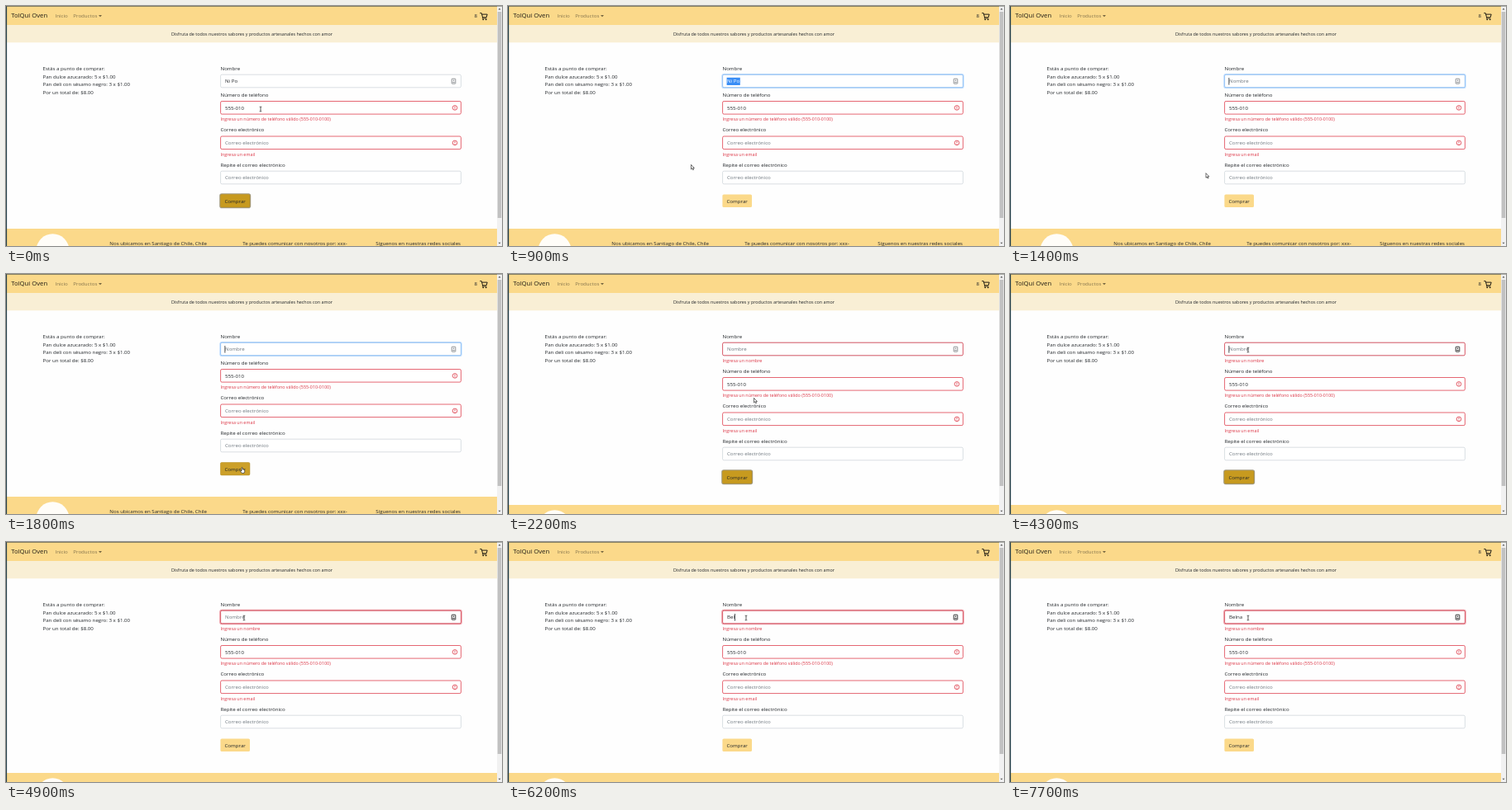
An HTML page for the animation above (8000 ms loop, 600 by 291 pixels).

```html
<!DOCTYPE html>
<html lang="es">
<head>
<meta charset="utf-8">
<title>Formulario de compra</title>
<style>
  html, body { margin: 0; width: 100%; height: 100%; overflow: hidden; background: #fefefe; }
  svg { display: block; width: 100vw; height: 100vh; }
  text { font-family: "Open Sans", "Noto Sans", sans-serif; font-size: 6.15px; fill: #212529; white-space: pre; }
  .brand { font-size: 7.7px; fill: #1c1a14; }
  .link { fill: #84744d; }
  .small { font-size: 5.42px; }
  .error { font-size: 5.4px; fill: #dc3545; }
  .hint { fill: #6c757d; }
</style>
</head>
<body>
<svg id="stage" viewBox="0 0 600 291" preserveAspectRatio="none"></svg>
<script>
const LOOP = 8000, STEP = 100;
const RED = '#dc3545', YELLOW = '#fbd98a', DARK = '#c79a1f';
const stage = document.getElementById('stage');

// Drawing helpers
function add(parent, tag, attrs, content) {
  const node = document.createElementNS('http://www.w3.org/2000/svg', tag);
  for (const key in attrs) node.setAttribute(key, attrs[key]);
  if (content) node.textContent = content;
  parent.appendChild(node);
  return node;
}
const group = parent => add(parent, 'g', {});
const rect = (parent, x, y, width, height, fill, more) =>
  add(parent, 'rect', { x, y, width, height, fill, ...more });
const path = (parent, d, more) => add(parent, 'path', { d, ...more });
// y is the optical middle of the line
const text = (parent, x, y, content, cls = '', more) =>
  add(parent, 'text', { x, y: y + 2.2, class: cls, ...more }, content);
const fade = (node, value) => node.setAttribute('opacity', value);

function outline(parent, y, stroke, width = 0.75, more) {
  return rect(parent, 259.6, y, 290.8, 15.6, 'none', { rx: 1.6, stroke, 'stroke-width': width, ...more });
}
function field(parent, y, content, cls, invalid) {
  rect(parent, 259.6, y, 290.8, 15.6, '#fff', { rx: 1.6 });
  outline(parent, y, invalid ? RED : '#ced4da');
  text(parent, 265, y + 8, content, cls);
  if (invalid) {
    const cy = y + 7.9;
    add(parent, 'circle', { cx: 543, cy, r: 2.8, fill: 'none', stroke: RED, 'stroke-width': 0.8 });
    path(parent, `M543 ${cy - 1.6}v1.8M543 ${cy + 0.9}v0.8`, { stroke: RED, 'stroke-width': 0.9 });
  }
}

// Page header
rect(stage, 0, 0, 600, 291, '#fefefe');
rect(stage, 0, 0, 594, 23, YELLOW);
rect(stage, 0, 23, 594, 21.3, '#f9efd5');
text(stage, 6.3, 12, 'TolQui Oven', 'brand');
text(stage, 59.5, 12, 'Inicio', 'link');
text(stage, 81.3, 12, 'Productos', 'link');
path(stage, 'M112 11h4l-2 2.2z', { fill: '#75663f' });
text(stage, 566.5, 12, '8');
path(stage, 'M573.3 8.6h1.9l1.4 5.2h4.5l1.1-3.7h-6.5', { fill: 'none', stroke: '#211d14', 'stroke-width': 1 });
path(stage, 'M576.6 13.8l-.3 1.2h5', { fill: 'none', stroke: '#211d14', 'stroke-width': 0.8 });
for (const cx of [577.2, 580.7]) add(stage, 'circle', { cx, cy: 16.3, r: 0.9, fill: '#211d14' });
text(stage, 297.5, 34, 'Disfruta de todos nuestros sabores y productos artesanales hechos con amor',
  'small', { 'text-anchor': 'middle' });

// Order summary
['Estás a punto de comprar:', 'Pan dulce azucarado: 5 x $1.00',
  'Pan deli con sésamo negro: 3 x $1.00', 'Por un total de: $8.00']
  .forEach((line, i) => text(stage, 44.5, 75.8 + i * 9.6, line));

// Name field
const nameY = 83.2;
text(stage, 259.5, 75.8, 'Nombre');
const blueRing = outline(stage, nameY, '#bfdeff', 2.6);
const redRing = outline(stage, nameY, '#ee9aa4', 2.8);
rect(stage, 259.6, nameY, 290.8, 15.6, '#fff', { rx: 1.6 });
outline(stage, nameY, '#ced4da');
const blueEdge = outline(stage, nameY, '#80bdff');
const redEdge = outline(stage, nameY, RED);
const selection = rect(stage, 264.6, 86.8, 16.2, 9.2, '#3a8ef6');
const nameText = text(stage, 265, 91.2, '');
const nameWidth = () => nameText.getComputedTextLength();
const caret = rect(stage, 264.5, 87, 0.8, 8.6, '#212529');
const card = group(stage);
rect(card, 539.2, 88.2, 4.6, 6, '#fff', { rx: 0.5, stroke: 'currentColor', 'stroke-width': 0.9 });
add(card, 'circle', { cx: 541.5, cy: 90.3, r: 0.8, fill: 'currentColor' });
path(card, 'M540.2 92.6h2.6', { stroke: 'currentColor', 'stroke-width': 0.9 });
const nameError = text(stage, 259.5, 104.8, 'Ingresa un nombre', 'error');

// Everything that slides down when the name error shows
const lower = group(stage);
text(lower, 259.5, 107.8, 'Número de teléfono');
field(lower, 115.5, '555-010', '', true);
text(lower, 259.5, 137.2, 'Ingresa un número de teléfono válido (555-010-0100)', 'error');
text(lower, 259.5, 150.2, 'Correo electrónico');
field(lower, 158, 'Correo electrónico', 'hint', true);
text(lower, 259.5, 179.6, 'Ingresa un email', 'error');
text(lower, 259.5, 192.6, 'Repite el correo electrónico');
field(lower, 200.2, 'Correo electrónico', 'hint', false);

const button = { x: 259.4, y: 228.4, w: 35.6, h: 15.6 };
const buttonRect = (fill, more) =>
  rect(lower, button.x, button.y, button.w, button.h, fill, { rx: 1.6, ...more });
const buttonRing = buttonRect('none', { stroke: '#a39c84', 'stroke-width': 2.4 });
buttonRect(YELLOW);
const buttonDark = buttonRect(DARK, { stroke: '#a98420', 'stroke-width': 0.5 });
text(lower, 277.2, 236.4, 'Comprar', '', { 'text-anchor': 'middle' });

rect(lower, 0, 270, 594, 40, YELLOW);
add(lower, 'circle', { cx: 56.5, cy: 296.3, r: 20, fill: '#fffdf8' });
text(lower, 125.3, 288, 'Nos ubicamos en Santiago de Chile, Chile');
text(lower, 286.3, 288, 'Te puedes comunicar con nosotros por: xxx-');
text(lower, 447.3, 288, 'Síguenos en nuestras redes sociales');

// Window edges and scrollbar
rect(stage, 0, 0, 1.1, 291, '#24404a');
rect(stage, 0, 0, 600, 0.7, '#5a5c50');
rect(stage, 594, 0.7, 6, 291, '#f1f1f1');
rect(stage, 594.7, 7, 4.6, 250, '#c1c1c1');
path(stage, 'M595.5 4.4h3l-1.5-1.8zM595.5 286.8h3l-1.5 1.8z', { fill: '#555' });

// Mouse pointers, each with its hot spot at 0,0
const mouse = group(stage);
const ink = { fill: '#fff', stroke: '#111', 'stroke-width': 0.6, 'stroke-linejoin': 'round' };
const pointers = {
  arrow: path(mouse, 'M-.5-2.6v5.6l1.3-1.2 .9 2 .9-.4-.9-1.9h1.7z', ink),
  beam: path(mouse, 'M-1.3-2.8h1l.3.3.3-.3h1M0-2.5v5M-1.3 2.8h1l.3-.3.3.3h1',
    { fill: 'none', stroke: '#111', 'stroke-width': 0.7 }),
  hand: path(mouse, 'M-.5-2.2q.6-.7 1.2 0v2l2.5.7v2.2l-.7 1.7h-2.7l-2-2.6 .5-.6 1.2.7z', ink)
};

// Time, x, y
const route = [
  [0, 308, 125], [200, 284, 92], [300, 280, 92], [500, 200, 98], [600, 162, 122],
  [800, 212, 184], [900, 222, 195], [1300, 222, 195], [1700, 284, 236], [1900, 287, 238],
  [2000, 290, 222], [2200, 298, 153], [3700, 298, 153], [4100, 289, 93], [4200, 288, 92], [LOOP, 288, 92]
];
const typing = [[5700, 'B'], [5900, 'Be'], [6200, 'Bel'], [6300, 'Beln'], [6500, 'Belna'], [6900, 'Belna ']];
const FOCUS = 200, SELECTED = 400, ERASED = 1300, SUBMIT = 1900, REFOCUS = 4300, HOVER = 1600;

const clamp = v => Math.max(0, Math.min(1, v));
const ramp = (t, start) => clamp((t - start) / 150);
const between = (t, a, b) => t >= a && t < b;

function mouseAt(t) {
  const i = Math.max(1, route.findIndex(p => p[0] > t));
  const [t0, x0, y0] = route[i - 1], [t1, x1, y1] = route[i];
  const k = (t - t0) / (t1 - t0);
  return [x0 + (x1 - x0) * k, y0 + (y1 - y0) * k];
}

function pointerAt(x, y, shift) {
  const inside = (top, left = 259, right = 551) =>
    x >= left && x <= right && y >= top && y <= top + 15.6;
  if (inside(button.y + shift, button.x, button.x + button.w)) return 'hand';
  const tops = [nameY, 115.5 + shift, 158 + shift, 200.2 + shift];
  return tops.some(top => inside(top)) ? 'beam' : 'arrow';
}

function draw(t) {
  const invalid = t >= SUBMIT;
  const shift = invalid ? 10 : 0;
  const typed = typing.filter(k => k[0] <= t).pop();

  lower.setAttribute('transform', `translate(0 ${shift})`);
  fade(nameError, invalid ? 1 : 0);

  const blue = ramp(t, FOCUS) * (1 - ramp(t, SUBMIT));
  fade(blueRing, blue);
  fade(blueEdge, blue);
  fade(redEdge, ramp(t, SUBMIT));
  fade(redRing, ramp(t, REFOCUS));

  const selected = between(t, SELECTED, ERASED);
  const value = t < ERASED ? 'Ni Po' : typed ? typed[1] : '';
  nameText.textContent = value || 'Nombre';
  nameText.style.fill = selected ? '#fff' : value ? '#212529' : '#6c757d';
  fade(selection, selected ? 1 : 0);

  // The caret restarts its blink at every click or key
  const since = typed ? typed[0] : t >= REFOCUS ? REFOCUS : ERASED;
  const focused = between(t, ERASED, SUBMIT) || t >= REFOCUS;
  fade(caret, focused && (t - since) % 1060 < 530 ? 1 : 0);
  caret.setAttribute('x', value ? 265.2 + nameWidth() : 264.5);

  const pressed = invalid ? 1 - ramp(t, REFOCUS) : 1 - ramp(t, FOCUS);
  fade(buttonRing, invalid ? Math.min(pressed, ramp(t, SUBMIT)) : pressed);
  fade(buttonDark, invalid ? pressed : Math.max(pressed, ramp(t, HOVER) * 0.9));

  const [x, y] = mouseAt(t);
  const shape = pointerAt(x, y, shift);
  mouse.setAttribute('transform', `translate(${x} ${y})`);
  for (const key in pointers) fade(pointers[key], key === shape ? 1 : 0);
  card.setAttribute('color', shape === 'beam' && y < 100 ? '#222' : '#85888c');
}

const start = performance.now();
function tick() {
  const t = (performance.now() - start) % LOOP;
  draw(Math.floor(t / STEP) * STEP);
  requestAnimationFrame(tick);
}
tick();
</script>
</body>
</html>
```
